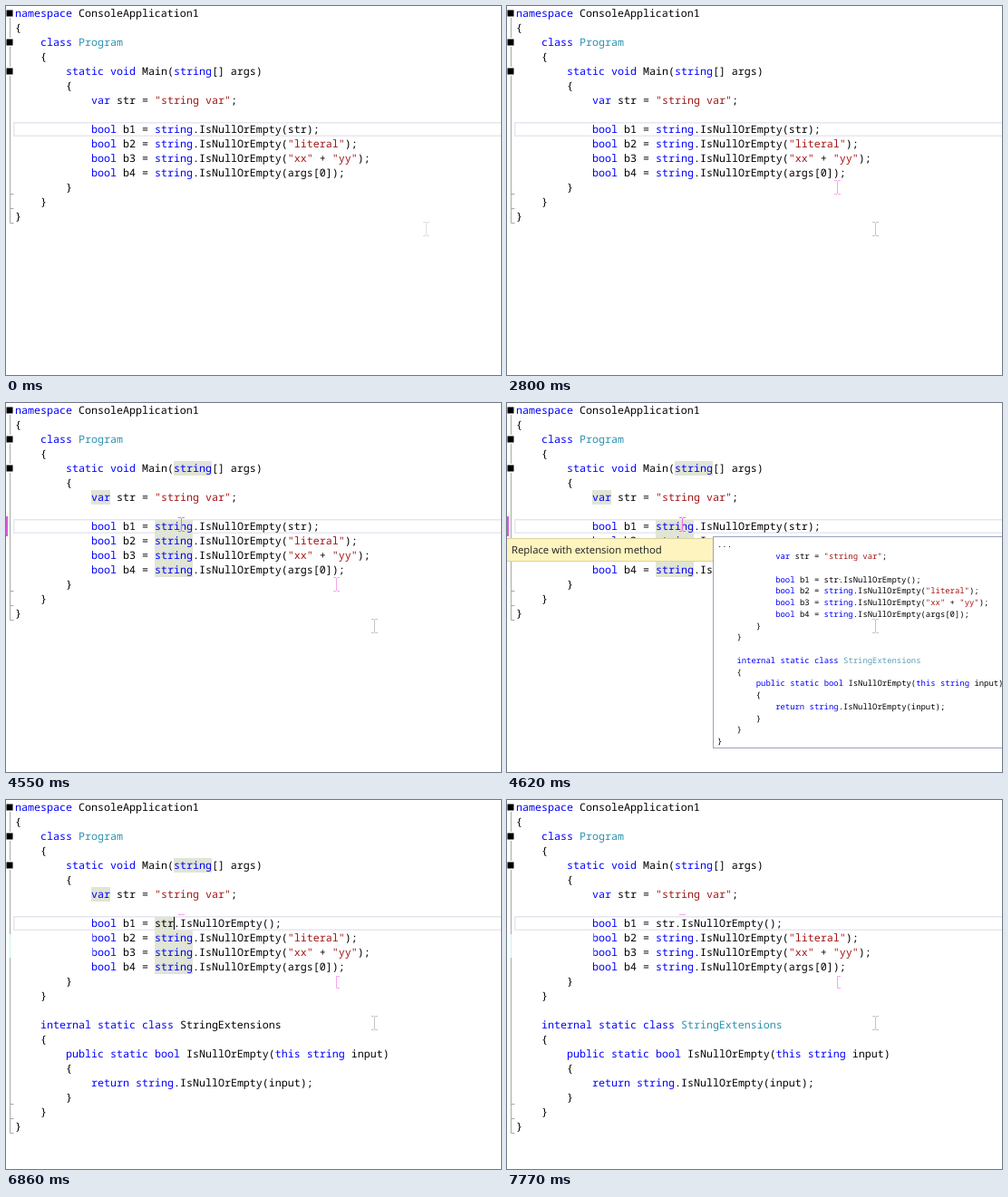
An HTML page that plays this animation: 546x407 px, repeating every 8 s.

```html
<!DOCTYPE html>
<html lang="en">
<head>
<meta charset="utf-8">
<title>Replace with extension method</title>
<style>
  html, body { margin: 0; width: 100%; height: 100%; overflow: hidden; background: #fff; }
  svg { display: block; width: 546px; height: 407px; }
  text { white-space: pre; text-rendering: geometricPrecision; }
  .code { font: 11.667px "Noto Sans Mono", "DejaVu Sans Mono", monospace; }
  .small { font-size: 8.91px; }
  .hint { font: 11.33px "Open Sans", "Noto Sans", sans-serif; fill: #1e1e1e; }
  .kw { fill: #0000ff; }
  .str { fill: #a31515; }
  .type { fill: #2b91af; }
  .small .type { fill: #5b9fba; }
  .mark { fill: #e0e5d5; }
  .caret { fill: #000; }
  .line { fill: none; stroke: #a8a8a8; }
  .fold rect { fill: #fff; stroke: #a898a8; }
  .fold path { stroke: #6a4a70; }
  .beam { fill: none; }
</style>
</head>
<body>
<svg viewBox="0 0 546 407">
  <defs>
    <path id="beam" d="M-3 .5h3M1 .5h3M-3 15.5h3M1 15.5h3M.5 1v14"/>
    <g id="fold"><rect x=".5" y="4.5" width="7" height="7"/><path d="M2 8h4"/></g>
  </defs>

  <rect x="8.75" y="128.75" width="545" height="14.5" fill="none" stroke="#e6e6f0" stroke-width="1.5"/>

  <g class="line">
    <path d="M4.5 13v22M4.5 45v22"/>
    <path data-on="0-6860" d="M4.5 77v162.500h4M4.5 207.500h4M4.5 223.500h4"/>
    <path data-on="6860-8000" d="M4.5 77v290.500h4M4.5 335.500h4M4.5 351.500h4"/>
  </g>
  <g class="fold">
    <use href="#fold"/><use href="#fold" y="32"/><use href="#fold" y="64"/>
  </g>
  <path data-on="6790-8000" d="M4.5 148v26" stroke="#c9f3f1"/>
  <rect data-on="4550-6860" y="125" width="2" height="22" fill="#d858dc"/>

  <g class="mark" data-on="3500-7000">
    <rect x="185" y="64" width="42" height="16"/>
    <rect x="94" y="96" width="21" height="16"/>
    <rect x="164" y="144" width="42" height="48"/>
    <rect data-on="0-6860" x="164" y="129" width="42" height="15"/>
    <rect data-on="6860-8000" x="164" y="129" width="21" height="15"/>
  </g>

  <g id="shared" class="code"></g>
  <g id="before" class="code" data-on="0-6860"></g>
  <g id="after" class="code" data-on="6860-8000"></g>
  <g id="plain" class="code" data-on="6860-7070"></g>
  <g id="typed" class="code" data-on="7070-8000"></g>
  <rect data-on="6790-8000" x="94" y="146" width="1.4" height="28" fill="#fff"/>

  <rect class="caret" data-on="3080-3570 4060-4550" x="192" y="129" width="1" height="14"/>
  <rect class="caret" data-on="6860-7280 7490-7770" x="185" y="129" width="1" height="14"/>

  <g data-on="4620-6790">
    <rect x="-.5" y="149.500" width="228" height="25" fill="#fdf4bf" stroke="#dcd3a0"/>
    <text class="hint" x="5" y="166">Replace with extension method</text>
  </g>
  <g data-on="4620-6860">
    <rect x="227.500" y="147.500" width="330" height="233" fill="#fff" stroke="#9aa2bc"/>
    <g id="preview" class="code small"></g>
    <rect x="366" y="194" width="2" height="1" fill="#f07090"/>
  </g>

  <g class="beam">
    <use href="#beam" data-on="0-1050" x="463" y="238" stroke="#dedede"/>
    <use href="#beam" data-on="1050-1120" x="463" y="238" stroke="#f0f0f0"/>
    <use href="#beam" data-on="2170-2240" x="376" y="203" stroke="#b8b8b8"/>
    <use href="#beam" data-on="2170-8000" x="406" y="238" stroke="#c4c4c4"/>
    <use href="#beam" data-on="2450-4620" x="364" y="192" stroke="#f7a4ec"/>
    <use href="#beam" data-on="2520-2590" x="320" y="174" stroke="#b8b8b8"/>
    <use href="#beam" data-on="2590-2660" x="270" y="154" stroke="#b8b8b8"/>
    <use href="#beam" data-on="2660-2730" x="225" y="135" stroke="#b8b8b8"/>
    <use href="#beam" data-on="2730-2800" x="196" y="122" stroke="#b8b8b8"/>
    <use href="#beam" data-on="3430-6860" x="193" y="126" stroke="#ee6ce2"/>
    <path data-on="6860-8000" d="M190 126.500h7M368 194.500h-3.500v13h3.500" stroke="#f7a4ec"/>
  </g>
</svg>

<script>
const NS = "http://www.w3.org/2000/svg";
const LOOP = 8000;
const TOKENS = /("[^"]*")|\b(namespace|class|static|void|string|var|bool|internal|public|this|return)\b|\b(Program|StringExtensions)\b/g;

const make = (name, parent, attrs) => {
  const el = document.createElementNS(NS, name);
  for (const key in attrs) el.setAttribute(key, attrs[key]);
  return parent.appendChild(el);
};

function codeLine(parent, line, x, y, colorTypes) {
  const el = make("text", parent, { x, y });
  const add = (text, cls) => {
    if (text) make("tspan", el, cls ? { class: cls } : {}).textContent = text;
  };
  let end = 0;
  for (const m of line.matchAll(TOKENS)) {
    add(line.slice(end, m.index));
    add(m[0], m[1] ? "str" : m[2] ? "kw" : colorTypes ? "type" : "");
    end = m.index + m[0].length;
  }
  add(line.slice(end));
}

function codeBlock(id, source, { x = 10, y = 12, dx = 7, dy = 16, row = 0, types = true } = {}) {
  const parent = document.getElementById(id);
  source.split("\n").forEach((line, i) => {
    const body = line.trimStart();
    if (body) codeLine(parent, body, x + dx * (line.length - body.length), y + dy * (row + i), types);
  });
}

const calls = `            bool b2 = string.IsNullOrEmpty("literal");
            bool b3 = string.IsNullOrEmpty("xx" + "yy");
            bool b4 = string.IsNullOrEmpty(args[0]);
        }
    }`;
const extension = `    {
        public static bool IsNullOrEmpty(this string input)
        {
            return string.IsNullOrEmpty(input);
        }
    }
}`;
const header = "    internal static class StringExtensions";
const newCall = "            bool b1 = str.IsNullOrEmpty();";

codeBlock("shared", `namespace ConsoleApplication1
{
    class Program
    {
        static void Main(string[] args)
        {
            var str = "string var";

\n${calls}`);
codeBlock("before", "            bool b1 = string.IsNullOrEmpty(str);", { row: 8 });
codeBlock("before", "}", { row: 14 });
codeBlock("after", newCall, { row: 8 });
codeBlock("after", extension, { row: 16 });
codeBlock("plain", header, { row: 15, types: false });
codeBlock("typed", header, { row: 15 });

const small = { x: 232, y: 172, dx: 5.346, dy: 12.75 };
codeBlock("preview", "...", { ...small, y: 159 });
codeBlock("preview", `            var str = "string var";

${newCall}
${calls}

${header}
${extension}`, small);

const parts = [...document.querySelectorAll("[data-on]")].map(el => ({
  el,
  spans: el.dataset.on.split(" ").map(s => s.split("-").map(Number))
}));

const start = performance.now();
function draw(now) {
  const t = Math.max(0, now - start) % LOOP;
  for (const { el, spans } of parts) {
    const on = spans.some(([from, to]) => t >= from && t < to);
    el.style.display = on ? "" : "none";
  }
  requestAnimationFrame(draw);
}
draw(start);
</script>
</body>
</html>
```
